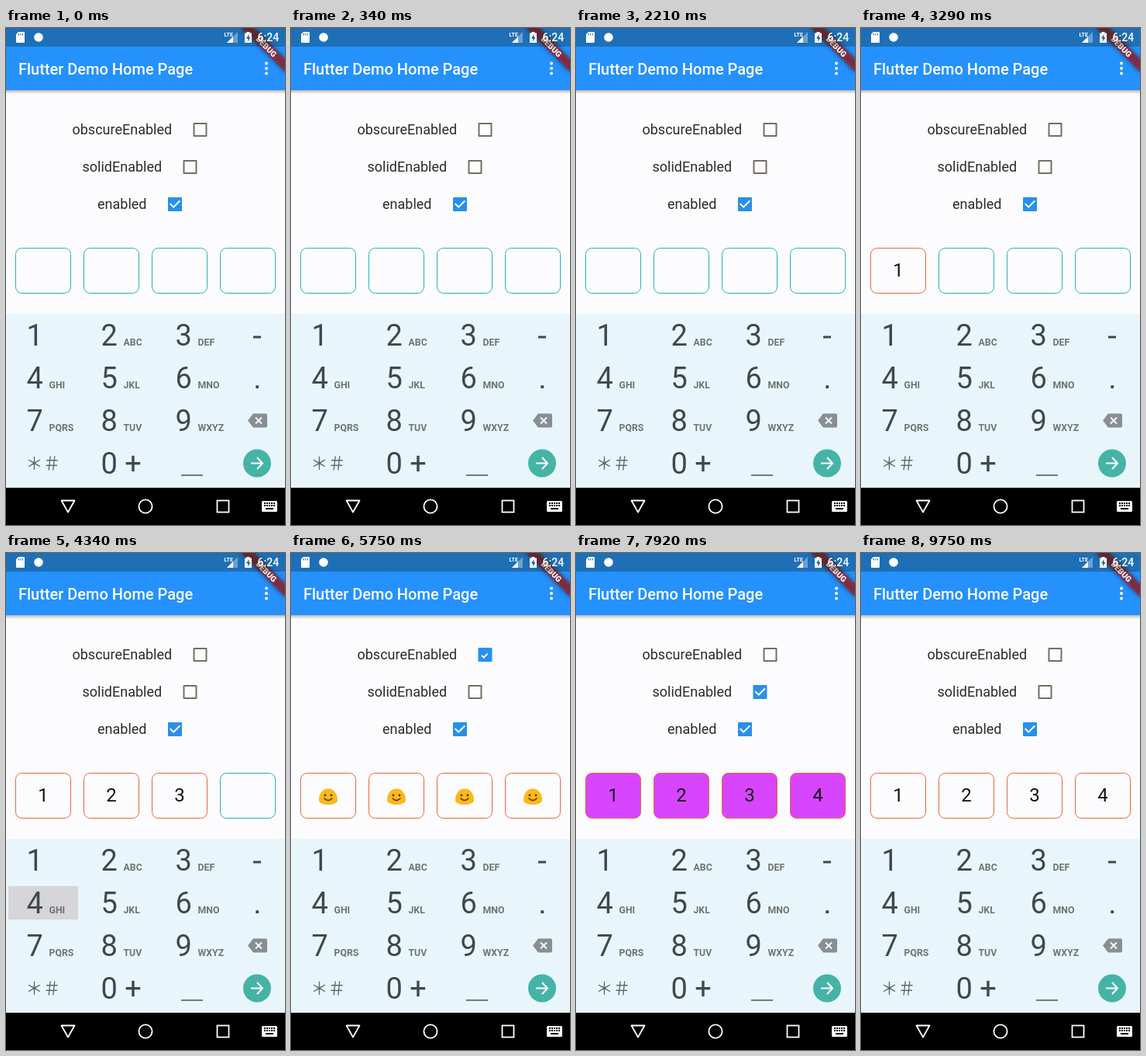
Animation, 360 px wide and 640 px high, one loop 9.79 s. Source, as an HTML page:

```html
<!DOCTYPE html>
<html lang="en">
<head>
<meta charset="utf-8">
<title>Pin input demo</title>
<style>
  html, body { margin: 0; width: 100%; height: 100%; overflow: hidden; background: #fcfcfe; }
  svg { display: block; font-family: Roboto, sans-serif; }
  text { white-space: pre; }
  .title { font-size: 20px; font-weight: 500; fill: #fff; }
  .label { font-size: 18px; fill: #2b2b27; }
  .pin { font-size: 24px; fill: #111; text-anchor: middle; }
  .key { font-size: 38px; fill: #40484d; }
  .sub { font-size: 12.3px; font-weight: 700; fill: #6f7472; }
  .wide { font: 22.5px "Noto Sans CJK JP", "Noto Sans CJK", sans-serif; fill: #5f676a; }
</style>
</head>
<body>
<svg id="stage" width="360" height="640" viewBox="0 0 360 640"></svg>
<script>
const LOOP = 9790;
const CHECK_MS = 200;
const KEY_MS = 110;
const PRESSES = [2850, 3380, 3880, 4290];

// Each box lists the times it is switched on and off; "enabled" never changes.
const CHECKS = [
  { label: 'obscureEnabled', cx: 250.5, cy: 131, on: 5590, off: 6620 },
  { label: 'solidEnabled', cx: 237.5, cy: 179, on: 7330, off: 8880 },
  { label: 'enabled', cx: 218, cy: 227, on: -CHECK_MS, off: Infinity }
];
const EMPTY = '#24b1b8', ENTERED = '#e9653f', SOLID = '#d845ff';
const GREY = [116, 112, 96], BLUE = [40, 144, 234];

const stage = document.getElementById('stage');
const text = (cls, x, y, s, extra = '') => `<text class="${cls}" x="${x}" y="${y}" ${extra}>${s}</text>`;
const rect = (x, y, w, h, fill, extra = '') =>
  `<rect x="${x}" y="${y}" width="${w}" height="${h}" fill="${fill}" ${extra}/>`;
const path = (d, fill, stroke = 'none', w = 2, extra = '') =>
  `<path d="${d}" fill="${fill}" stroke="${stroke}" stroke-width="${w}" ${extra}/>`;
const circle = (x, y, r, fill, extra = '') => `<circle cx="${x}" cy="${y}" r="${r}" fill="${fill}" ${extra}/>`;

function appBar() {
  return `<defs>
      <linearGradient id="shade" x2="0" y2="1">
        <stop stop-color="#000" stop-opacity=".28"/><stop offset="1" stop-color="#000" stop-opacity="0"/>
      </linearGradient>
      <filter id="blur" x="-20%" y="-100%" width="140%" height="300%"><feGaussianBlur stdDeviation="3"/></filter>
    </defs>` +
    rect(0, 80, 360, 5, 'url(#shade)') +
    rect(0, 0, 360, 80, '#2491fd') +
    text('title', 16, 60, 'Flutter Demo Home Page') +
    [45.5, 52, 58.5].map(y => circle(336, y, 2, '#fff')).join('');
}

function banner() {
  return `<g transform="translate(360 0) rotate(45)">` +
    rect(-40, 28, 80, 12, '#000', 'opacity=".5" filter="url(#blur)"') +
    rect(-40, 28, 80, 12, '#b71c1c', 'opacity=".63"') +
    text('', 0, 37.6, 'DEBUG', 'fill="#fff" font-size="10.2" font-weight="900" text-anchor="middle"') +
    '</g>';
}

function statusBar() {
  return rect(0, 0, 360, 24, 'rgba(20,24,0,.28)') +
    path('M16 5H23Q24 5 24 6V18Q24 19 23 19H14Q13 19 13 18V8Z', '#fff') +
    path('M16.5 7V9.5M19 7V9.5M21.5 7V9.5', 'none', '#1f6fb4', 1) +
    circle(42, 12, 5.8, '#fff') +
    text('', 281.5, 11, 'LTE', 'fill="#fff" font-size="7" font-weight="700"') +
    path('M299 5V19H285Z', 'rgba(255,255,255,.35)') +
    path('M293 11V19H285Z', '#fff') +
    path('M308 6.5H310.5V5H314.5V6.5H317V19H308Z', '#fff') +
    path('M313.5 8L310 13.5H312.2V17.5L315.4 12H313.5Z', '#1b5f9c') +
    text('', 324.5, 17, '6:24', 'fill="#fff" font-size="14" font-weight="500"');
}

// A row is centred on the stage, with its checkbox in a 48px cell at the right.
function checkbox({ label, cx, cy }, i) {
  return text('label', 336 - cx, cy + 6, label) +
    `<g transform="translate(${cx - 9} ${cy - 9})">
      <rect id="box${i}" width="18" height="18" rx="1"/>
      <rect id="hole${i}" fill="#fcfcfe"/>
      <path id="tick${i}" fill="none" stroke="#fff" stroke-width="2"/>
    </g>`;
}

function pin(i) {
  const x = 12 + 88 * i, c = x + 36;
  const face = circle(c - 4, 312, 1.4, '#4a3418') + circle(c + 4, 312, 1.4, '#4a3418') +
    path(`M${c - 5} 316Q${c} 321 ${c + 5} 316`, 'none', '#4a3418', 1.5, 'stroke-linecap="round"');
  const blob = `M${c} 303.5C${c + 8} 303.5 ${c + 12} 311 ${c + 12} 318` +
    `C${c + 12} 326 ${c - 12} 326 ${c - 12} 318C${c - 12} 311 ${c - 8} 303.5 ${c} 303.5Z`;
  return `<rect id="pin${i}" x="${x + .5}" y="283.5" width="71" height="58" rx="8"/>` +
    text('pin', c, 320, i + 1, `id="digit${i}"`) +
    `<g id="smile${i}">${path(blob, '#fdb819')}${face}</g>`;
}

function keyboard() {
  const subs = ['', 'ABC', 'DEF', 'GHI', 'JKL', 'MNO', 'PQRS', 'TUV', 'WXYZ'];
  const keys = subs.map((s, i) => {
    const x = 96 * (i % 3), y = 409 + 55 * Math.floor(i / 3);
    return text('key', x + 26.5, y, i + 1) + text('sub', x + 55.5, y, s);
  }).join('');
  return rect(0, 368, 360, 224, '#e8f6fc') +
    '<rect id="press" width="90" height="43" fill="#d6d5d9"/>' + keys +
    rect(319, 396.5, 10, 3, '#40484d') +
    rect(322.3, 460.2, 3.8, 3.8, '#40484d') +
    text('wide', 25.3, 569, '＊＃') +
    text('key', 122.5, 574, '0 +') +
    rect(226, 575, 28, 1.7, '#5d666a') +
    path('M319 496.5H335Q337 496.5 337 498.5V512.5Q337 514.5 335 514.5H319L312 505.5Z', '#888e91') +
    path('M322 501.5L330 509.5M330 501.5L322 509.5', 'none', '#f2f7f7', 2) +
    circle(324, 560.5, 18, '#46b3a7') +
    path('M316 560.5H331M324 553L331 560.5L324 568', 'none', '#fff', 2);
}

function navBar() {
  const dots = Array.from({ length: 10 }, (_, i) =>
    rect(333 + 3 * (i % 5), 611 + 3 * Math.floor(i / 5), 2, 2, '#000')).join('');
  return rect(0, 592, 360, 48, '#000') +
    path('M71.5 608.5H88.5L80 623.5Z', 'none', '#fff', 1.8, 'stroke-linejoin="round"') +
    circle(180, 616, 8.6, 'none', 'stroke="#fff" stroke-width="1.8"') +
    rect(272.5, 608.5, 15, 15, 'none', 'stroke="#fff" stroke-width="1.8"') +
    rect(330, 609, 20, 14, '#fff', 'rx="1.5"') + dots + rect(335, 618, 10, 2, '#000');
}

stage.innerHTML = rect(0, 0, 360, 640, '#fcfcfe') + appBar() + banner() + statusBar() +
  CHECKS.map(checkbox).join('') + [0, 1, 2, 3].map(pin).join('') + keyboard() + navBar();

const el = id => document.getElementById(id);
const set = (id, attrs) => { for (const k in attrs) el(id).setAttribute(k, attrs[k]); };
const show = (id, on) => set(id, { visibility: on ? 'visible' : 'hidden' });
const clamp = v => Math.max(0, Math.min(1, v));
const mix = (a, b, p) => a + (b - a) * p;

// The frame fills inward first, then the tick grows from its corner.
function drawCheck({ on, off }, i, t) {
  const p = clamp((t - on) / CHECK_MS) - clamp((t - off) / CHECK_MS);
  const fill = clamp(p * 2), grow = clamp(p * 2 - 1);
  const inset = mix(2, 9, fill), size = 18 - 2 * inset;
  set('box' + i, { fill: `rgb(${GREY.map((g, k) => Math.round(mix(g, BLUE[k], fill)))})` });
  set('hole' + i, { x: inset, y: inset, width: size, height: size });
  const mx = 7.2, my = 12.6;
  set('tick' + i, {
    d: `M${mix(mx, 2.7, grow)} ${mix(my, 8.1, grow)}L${mx} ${my}L${mix(mx, 15.3, grow)} ${mix(my, 4.5, grow)}`
  });
  show('tick' + i, grow > 0);
}

function draw(t) {
  const active = c => t >= c.on && t < c.off;
  const obscure = active(CHECKS[0]), solid = active(CHECKS[1]);
  CHECKS.forEach((c, i) => drawCheck(c, i, t));

  PRESSES.forEach((at, i) => {
    const entered = t >= at + KEY_MS;
    set('pin' + i, { stroke: entered ? ENTERED : EMPTY, fill: solid ? SOLID : 'none' });
    show('digit' + i, entered && !obscure);
    show('smile' + i, entered && obscure);
  });

  const key = PRESSES.findIndex(at => t >= at && t < at + KEY_MS);
  show('press', key >= 0);
  if (key >= 0) set('press', { x: 3 + 96 * (key % 3), y: 374 + 55 * Math.floor(key / 3) });
}

const start = performance.now();
function tick() {
  draw((performance.now() - start) % LOOP);
  requestAnimationFrame(tick);
}
tick();
</script>
</body>
</html>
```
